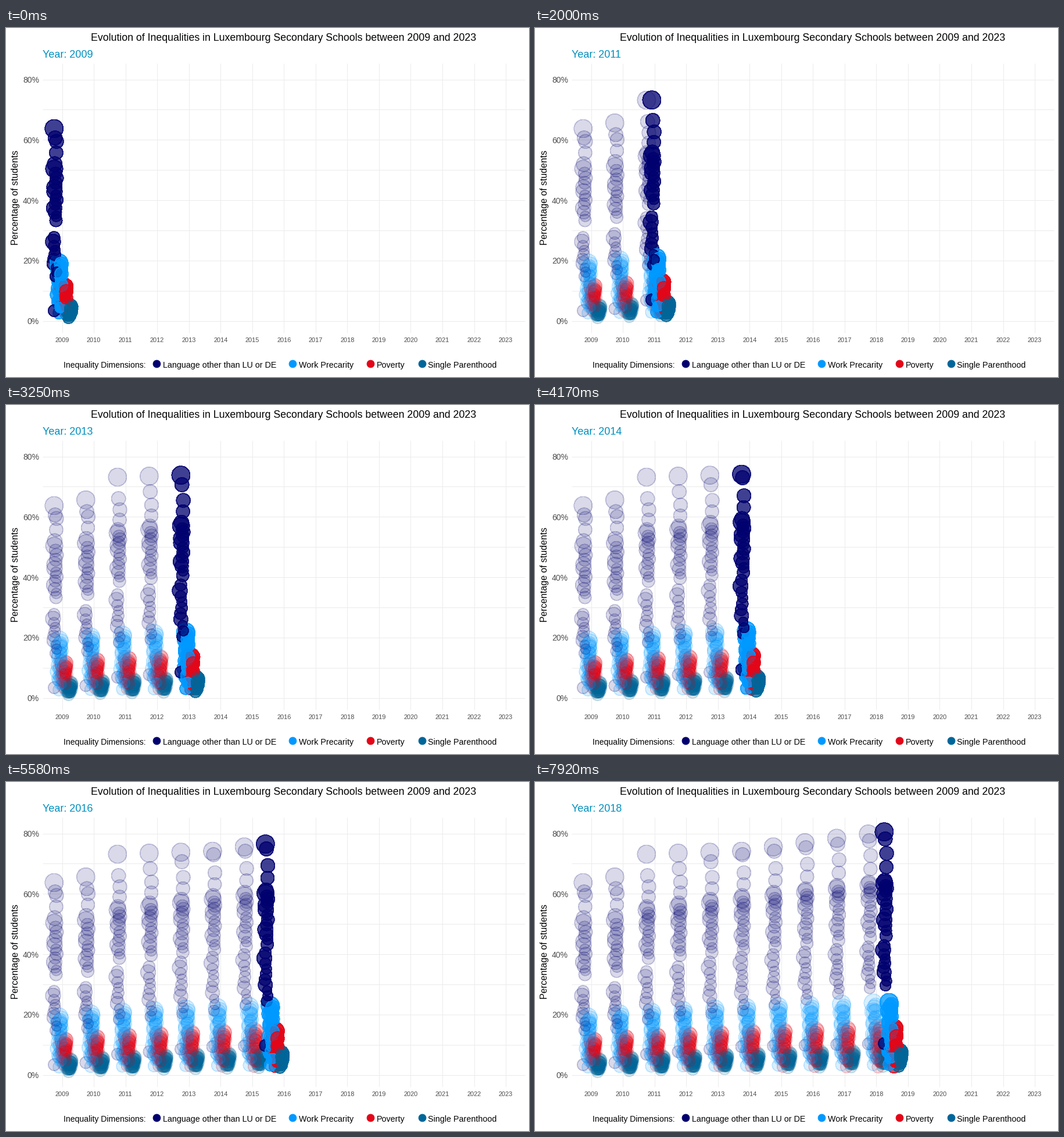
A matplotlib script that plays this animation: 900x600 px, repeating every 8 s.

```python
import numpy as np
import matplotlib.pyplot as plt
from matplotlib.animation import FuncAnimation

W, H, DPI = 900, 600, 100
PX = 72 / DPI  # points per pixel
FRAMES, INTERVAL = 160, 50
FIRST_X, YEAR_STEP = 96.5, 54.54
ZERO_Y, TEN_PERCENT = 503.5, 51.87
DIM_STEP = 8.3  # dodge between the four dimensions

NAVY, BLUE, RED, TEAL = "#00006f", "#0099ff", "#e30618", "#006699"
GREY = "#4d4d4d"

# The motion runs in 12 steps per second; each move leads one year further.
STEPS_PER_MS = 12 / 1000
STARTS = [3, 13, 23, 33, 43, 53, 63, 72, 82, 92]
ENDS = [9, 19, 29, 39, 50, 59, 69, 79, 88, 98]
knots = np.ravel(np.column_stack([STARTS, ENDS]))
knot_years = (np.arange(len(knots)) + 1) // 2

# Schools ranked by language share: dodge offset and radius swing with rank.
SCHOOLS = 29
rank = np.arange(SCHOOLS)
wave = np.cos(2 * np.pi * rank / 4.7)
dodge = -11.5 - 2.2 * wave - 2.5 * np.exp(-((rank - 20.5) / 3) ** 2)
radius = 12.9 - 0.13 * rank + 1.5 * wave + 1.2 * np.cos(2 * np.pi * rank / 2.4)

# Language heights in stage pixels at a few ranks, for four key years.
KEY_RANKS = [0, 1, 2, 4, 9, 17, 18, 27, 28]
KEY_HEIGHTS = {0: [173, 189, 195, 234, 274, 331, 360, 427, 486],
               2: [124, 161, 180, 215, 242, 303, 326, 408, 468],
               5: [119, 125, 156, 196, 223, 288, 301, 393, 455],
               10: [82, 95, 119, 167, 188, 262, 279, 345, 449]}
years = np.arange(11)


def language():
    by_key = np.array([np.interp(rank, KEY_RANKS, h)
                       for h in KEY_HEIGHTS.values()])
    pace = np.where(years == 1, 0.4, years)  # little changes in the first year
    return np.array([np.interp(pace, list(KEY_HEIGHTS), col)
                     for col in by_key.T])


def drift(first, last, jitter):
    """Spread ranks over a range that moves fast at first, then levels off."""
    u = rank[:, None] / (SCHOOLS - 1)
    start = first[0] + (first[1] - first[0]) * u
    end = last[0] + (last[1] - last[0]) * u
    wobble = jitter * np.sin(2.3 * rank[:, None])
    return start + (end - start) * (years / 9) ** 0.7 + wobble


tracks = np.stack([language(),
                   drift((404, 486), (380, 482), 4),
                   drift((445, 482), (424, 486), 4),
                   drift((480, 496), (465, 487), 2)], axis=1)

# Paint school by school from left to right, language on top.
order = np.argsort(dodge)
paint = [2, 3, 1, 0]
heights = tracks[order][:, paint].reshape(-1, len(years))
offsets = (dodge[order, None] + DIM_STEP * np.array(paint)).ravel()
radii = np.repeat(radius[order], len(paint))
colors = [(NAVY, BLUE, RED, TEAL)[d] for d in paint] * SCHOOLS


def points(pos):
    """Centres of all circles at a position in years after 2009."""
    year = min(int(pos), len(years) - 2)
    part = pos - year
    y = heights[:, year] * (1 - part) + heights[:, year + 1] * part
    return np.column_stack([FIRST_X + YEAR_STEP * pos + offsets, y])


fig = plt.figure(figsize=(W / DPI, H / DPI), dpi=DPI, facecolor="white")
ax = fig.add_axes([0, 0, 1, 1])
ax.set(xlim=(0, W), ylim=(H, 0))
ax.axis("off")


def text(x, y, s, px, color="black", **kw):
    return ax.text(x, y, s, fontsize=px * PX, color=color,
                   family="Liberation Sans", **kw)


def circles(alpha, zorder):
    return ax.scatter(np.zeros(len(radii)), np.zeros(len(radii)),
                      s=(2 * radii * PX) ** 2, c=colors, alpha=alpha,
                      linewidths=0.8 * PX, zorder=zorder, antialiased=False)


grid = dict(color="#ebebeb", lw=PX, zorder=0, solid_capstyle="butt")
for i in range(9):
    y = ZERO_Y - i * TEN_PERCENT
    ax.plot([63, 893], [y, y], **grid)
    if i % 2 == 0:
        text(57, y + 5.5, f"{i * 10}%", 14, GREY, ha="right")
for i in range(15):
    x = FIRST_X + i * YEAR_STEP
    ax.plot([x, x], [61, 524], **grid)
    text(x, 540, str(2009 + i), 11, GREY, ha="center")

text(477.5, 22, "Evolution of Inequalities in Luxembourg Secondary Schools "
     "between 2009 and 2023", 17.8, ha="center")
year_label = text(63, 51, "", 18, "#0090bf")
text(17, 291.5, "Percentage of students", 15.9, rotation=90,
     ha="center", va="center")

text(99, 584, "Inequality Dimensions:", 14)
for x, color, label in [(259, NAVY, "Language other than LU or DE"),
                        (493, BLUE, "Work Precarity"),
                        (627, RED, "Poverty"),
                        (716, TEAL, "Single Parenthood")]:
    ax.scatter([x], [577], s=(12.7 * PX) ** 2, c=color, linewidths=PX,
               antialiased=False)
    text(x + 10.5, 584, label, 14.2)

shadow = circles(0.15, 2)
current = circles(0.75, 3)


def update(frame):
    step = int((frame * INTERVAL + 40) * STEPS_PER_MS)
    pos = float(np.interp(step, knots, knot_years))
    past = int(np.ceil(pos - 1e-6))
    shadow.set_visible(past > 0)
    if past:
        shadow.set_offsets(np.vstack([points(k) for k in range(past)]))
    current.set_offsets(points(pos))
    year_label.set_text(f"Year: {2009 + int(np.ceil(pos - 0.5 - 1e-6))}")
    return shadow, current, year_label


anim = FuncAnimation(fig, update, frames=FRAMES, interval=INTERVAL,
                     repeat=True, repeat_delay=0)
plt.show()
```
